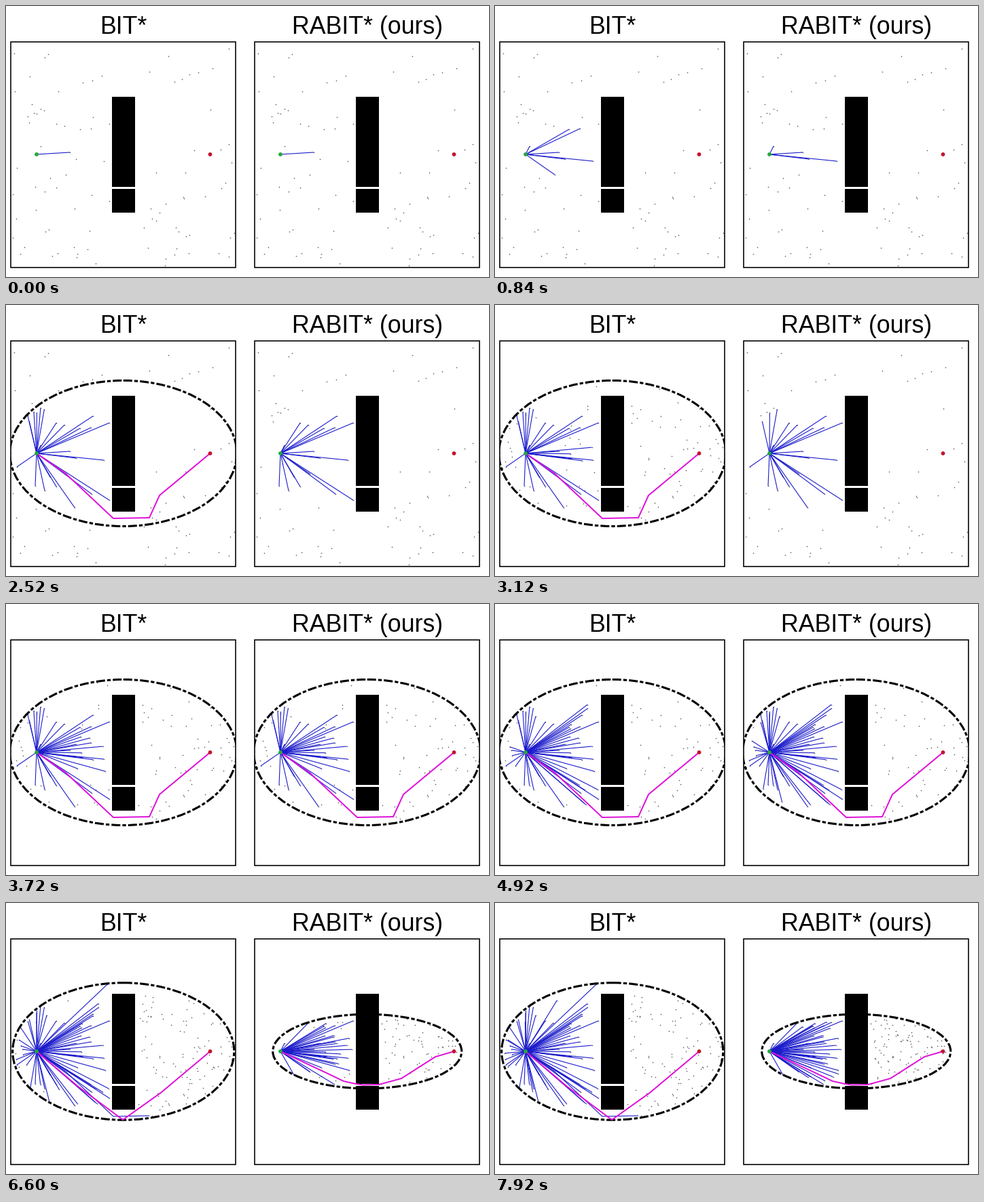
Animation of 711 by 400 pixels, one loop 8000 ms. Source, as a matplotlib script:

```python
import math
import random

import matplotlib.pyplot as plt
from matplotlib.animation import FuncAnimation
from matplotlib.collections import LineCollection
from matplotlib.patches import Circle, Ellipse, Rectangle

W, H, DPI = 711, 400, 64
PX = 72 / DPI  # points per pixel
STEP_FRAMES, FRAMES, INTERVAL = 3, 200, 40

START, GOAL = (45, 219), (300.5, 219)
FOCUS = (GOAL[0] - START[0]) / 2
WIDE, MIDDLE, NARROW = 167, 163, 139  # semi-major axes
BOX = (7, 53, 338, 386)
WALL = (155.5, 190.2)

# Main branches of the first tree
TIPS = [
    (94, 216), (103, 226), (144, 229), (152, 174), (128, 164), (109, 182),
    (125, 181), (86, 177), (74, 174), (51, 207), (65, 254), (88, 249),
    (74, 268), (126, 279), (152, 288), (57, 274), (43, 267), (101, 299),
    (16, 239),
]
AROUND = [START, (88, 249), (158, 315), (211, 314), (226, 281), GOAL]
TIGHT = [START, (105, 270), (172, 320), (228, 280), GOAL]
THROUGH = [START, (111, 250), (138, 263), (156, 267), (166, 268.5),
           (190, 268), (223, 259), (273, 227), GOAL]


def cost(p):
    return math.dist(p, START) + math.dist(p, GOAL)


def minor(a):
    return math.sqrt(a * a - FOCUS * FOCUS)


def fan(count, a, seed, low=0, high=360, shortest=0.5):
    """Branch tips around the start, inside the ellipse and before the wall."""
    rng = random.Random(seed)
    tips = []
    for k in range(count):
        angle = math.radians(low + (high - low) * (k + rng.random()) / count)
        c, s = math.cos(angle), math.sin(angle)
        reach = minor(a) ** 2 / (a - FOCUS * c)
        if c > 0:
            reach = min(reach, (WALL[0] - 2 - START[0]) / c)
        r = reach * rng.uniform(shortest, 0.98)
        tips.append((START[0] + r * c, START[1] + r * s))
    return tips


def scatter(count, seed, accept):
    """Uniform samples in the panel that pass the test."""
    rng = random.Random(seed)
    points = []
    while len(points) < count:
        p = (rng.uniform(BOX[0] + 2, BOX[2] - 2),
             rng.uniform(BOX[1] + 2, BOX[3] - 2))
        if accept(p):
            points.append(p)
    return points


def beyond(a):
    """Test for samples right of the wall and inside the ellipse."""
    return lambda p: p[0] > WALL[1] + 3 and cost(p) < 2 * a - 3


def outlying(p):
    off_wall = not WALL[0] - 2 < p[0] < WALL[1] + 2
    return off_wall and (p[0] > WALL[1] or cost(p) > 2 * WIDE)


class Batch:
    """Samples shown from one step on; the tree reaches its nodes by cost."""

    def __init__(self, start, end, nodes, dots, ease=1.3):
        self.start, self.end, self.ease = start, end, ease
        self.nodes = sorted(nodes, key=cost)
        self.points = self.nodes + dots

    def grown(self, n):
        if n < self.start or not self.nodes:
            return []
        t = min(1, (n - self.start) / (self.end - self.start))
        return self.nodes[:1 + int((len(self.nodes) - 1) * t ** self.ease)]


class Panel:
    def __init__(self, ax, dx, title, batches, solutions):
        self.dx, self.batches, self.solutions = dx, batches, solutions
        left, top, right, bottom = BOX
        frame = Rectangle((left + dx, top), right - left, bottom - top,
                          fc="none", ec="black", lw=1.6 * PX, zorder=8)
        ax.add_patch(frame)
        ax.text(172.8 + dx, 41, title, ha="center", va="baseline",
                family="Liberation Sans", size=35.7 * PX)
        for y0, y1 in ((133.5, 267), (269.8, 304.5)):
            ax.add_patch(Rectangle((WALL[0] + dx, y0), WALL[1] - WALL[0],
                                   y1 - y0, fc="black", lw=0, zorder=3))
        self.dots = ax.scatter([], [], s=(1.6 * PX) ** 2, c="#5a5a5a", lw=0,
                               zorder=1)
        self.tree = LineCollection([], colors="#1a1acc", lw=1.1 * PX,
                                   zorder=4)
        ax.add_collection(self.tree)
        center = ((START[0] + GOAL[0]) / 2 + dx, START[1])
        self.bound = Ellipse(center, 1, 1, fc="none", ec="black",
                             lw=3.1 * PX, zorder=5,
                             ls=(0, (4.2, 1, 1.7, 1)))
        ax.add_patch(self.bound)
        self.bound.set_clip_path(frame)
        self.path, = ax.plot([], [], color="#df12da", lw=2 * PX, zorder=6)
        for (x, y), color in ((START, "#22a83c"), (GOAL, "#c4142c")):
            ax.add_patch(Circle((x + dx, y), 2.9, fc=color, lw=0, zorder=7))

    def shift(self, points):
        return [(x + self.dx, y) for x, y in points]

    def found(self, n):
        return [s for s in self.solutions if s[0] <= n]

    def limit(self, n):
        found = self.found(n)
        return 2 * found[-1][1] + 0.5 if found else math.inf

    def update(self, n):
        keep = self.limit(n - 1)
        dots = [p for b in self.batches if b.start <= n
                for p in b.points if cost(p) < keep]
        self.dots.set_offsets(self.shift(dots))

        found = self.found(n)
        edges = [(START, p) for b in self.batches for p in b.grown(n)]
        for _, _, old in found[:-1]:
            edges += zip(old[:-3], old[1:-2])
        keep = self.limit(n)
        self.tree.set_segments([self.shift(e) for e in edges
                                if cost(e[1]) < keep])

        self.bound.set_visible(bool(found))
        self.path.set_visible(bool(found))
        if found:
            _, a, path = found[-1]
            self.bound.set_width(2 * a)
            self.bound.set_height(2 * minor(a))
            self.path.set_data(*zip(*self.shift(path)))


fig = plt.figure(figsize=(W / DPI, H / DPI), dpi=DPI, facecolor="white")
ax = fig.add_axes([0, 0, 1, 1])
ax.set_xlim(0, W)
ax.set_ylim(H, 0)
ax.axis("off")

# Both planners draw the same first two batches
nodes_1 = TIPS + fan(6, WIDE, 2, 252, 282, 0.8)
dots_1 = scatter(66, 5, outlying)
nodes_2 = fan(22, WIDE, 11) + fan(14, WIDE, 8, -45, 45)
dots_2 = scatter(38, 3, beyond(WIDE))

panels = [
    Panel(ax, 0, "BIT*", [
        Batch(0, 20, nodes_1, dots_1),
        Batch(22, 47, nodes_2, dots_2),
        Batch(51, 66, fan(9, MIDDLE, 6), scatter(50, 4, beyond(MIDDLE)), 1),
    ], [(21, WIDE, AROUND), (50, MIDDLE, TIGHT)]),
    Panel(ax, 359, "RABIT* (ours)", [
        Batch(0, 28, nodes_1, dots_1),
        Batch(30, 44, nodes_2, dots_2, 0.5),
        Batch(46, 66, fan(18, NARROW, 7, -38, 38, 0.7),
              scatter(45, 7, beyond(NARROW)), 1),
        Batch(57, 66, [], scatter(35, 9, beyond(NARROW))),
    ], [(29, WIDE, AROUND), (45, NARROW, THROUGH)]),
]


def draw(frame):
    for panel in panels:
        panel.update(frame // STEP_FRAMES)
    return []


anim = FuncAnimation(fig, draw, frames=FRAMES, interval=INTERVAL,
                     init_func=lambda: draw(0), repeat=True, repeat_delay=0)
plt.show()
```
